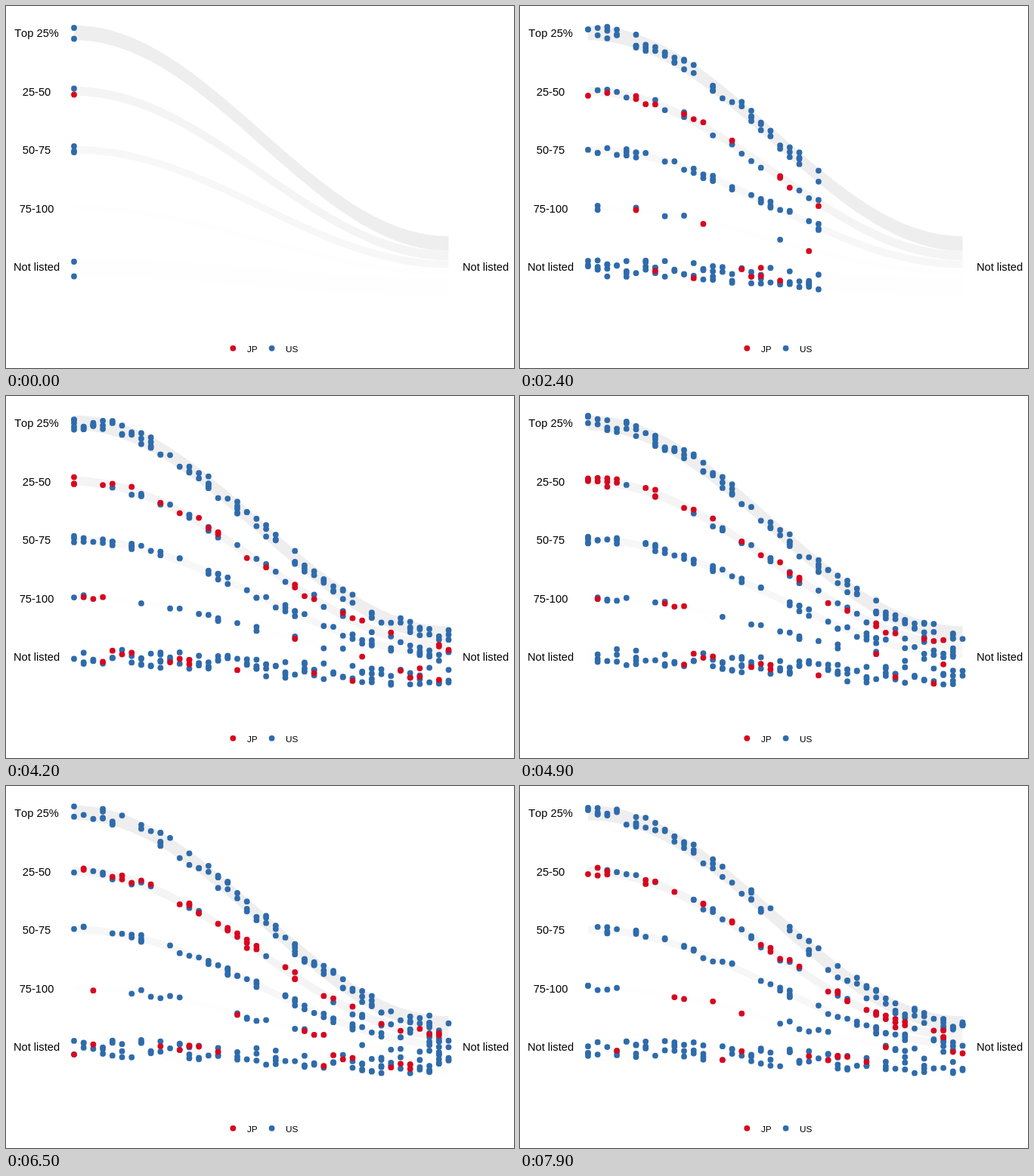
Animation of 672 by 480 pixels, one loop 8 s. Source, as an HTML page:

```html
<!DOCTYPE html>
<html lang="en">
<head>
<meta charset="utf-8">
<title>Flow between groups</title>
<style>
  html, body { margin: 0; width: 100%; height: 100%; overflow: hidden; background: #fff; }
  svg { display: block; }
  text { font: 14.67px "Liberation Sans", Arial, sans-serif; font-kerning: none; text-anchor: middle; }
  .key { font-size: 11.73px; text-anchor: start; }
</style>
</head>
<body>
<svg width="672" height="480" viewBox="0 0 672 480">
  <g id="bands"></g>
  <g id="labels"></g>
  <text x="634.5" y="351">Not listed</text>
  <g id="legend"></g>
  <text class="key" x="319" y="459">JP</text>
  <text class="key" x="370" y="459">US</text>
  <g id="dots"></g>
</svg>
<script>
const LEFT = 90, STEP = 12.705, STEPS = 39, FRAMES = 80, FRAME_MS = 100;
const JP = '#d7071f', US = '#2f6bab';

// from/to: centre heights, half: half thickness, rate: dots per step,
// jp: share of JP, first: offsets of the dots present at the start
const bands = [
  { label: 'Top 25%', from: 35.5, to: 315, half: 9.8, fill: '#eee', rate: 2.4, jp: 0, first: [-6.5, 8] },
  { label: '25-50', from: 113, to: 331, half: 6, fill: '#f4f4f4', rate: 1.4, jp: .5, first: [-3.5, 4.5] },
  { label: '50-75', from: 190.5, to: 342.5, half: 5, fill: '#f7f7f7', rate: 1.4, jp: 0, first: [-4.5, 2, 3.5] },
  { label: '75-100', from: 267.5, to: 353.5, half: 3.5, fill: '#fefefe', rate: .6, jp: .35, first: [] },
  { label: 'Not listed', from: 347, to: 372.5, half: 12, fill: '#fefefe', rate: 3, jp: .12, first: [-8, 11.5] }
];

let seed = 41;
function random() {
  seed = seed + 0x6D2B79F5 | 0;
  let n = Math.imul(seed ^ seed >>> 15, 1 | seed);
  n = n + Math.imul(n ^ n >>> 7, 61 | n) ^ n;
  return ((n ^ n >>> 14) >>> 0) / 2 ** 32;
}

const get = id => document.getElementById(id);
const circle = (x, y, color) => `<circle cx="${x}" cy="${y}" r="3.9" fill="${color}"/>`;

// Height of a band's centre line after k steps
const centre = (band, k) =>
  band.from + (band.to - band.from) * (1 - Math.cos(Math.PI * k / STEPS)) / 2;

function ribbon(band) {
  const edge = side => Array.from({ length: STEPS + 1 }, (_, k) =>
    `${LEFT + k * STEP},${centre(band, k) + side * band.half}`);
  return `<polygon fill="${band.fill}" points="${[...edge(-1), ...edge(1).reverse()].join(' ')}"/>`;
}

const dots = bands.flatMap(band => band.first.map(offset =>
  ({ band, born: 0, offset, color: band.jp > .4 && offset > 0 ? JP : US })));

for (let born = 1; born < FRAMES; born++) {
  for (const band of bands) {
    for (let i = 0; i < 6; i++) {
      if (random() > band.rate / 6) continue;
      const offset = (random() * 2 - 1) * band.half;
      dots.push({ band, born, offset, color: random() < band.jp ? JP : US });
    }
  }
}
// JP dots lie on top
dots.sort((a, b) => (a.color === JP) - (b.color === JP));

get('bands').innerHTML = bands.map(ribbon).join('');
get('labels').innerHTML = bands.map((b, i) =>
  `<text x="40.5" y="${41 + i * 77.5}">${b.label}</text>`).join('');
get('legend').innerHTML = circle(300.3, 453.8, JP) + circle(351.6, 453.8, US);

const start = performance.now();
let shown = -1;
function draw() {
  const frame = Math.floor((performance.now() - start) / FRAME_MS) % FRAMES;
  if (frame !== shown) {
    shown = frame;
    get('dots').innerHTML = dots
      .filter(d => d.born <= frame && frame - d.born <= STEPS)
      .map(d => {
        const k = frame - d.born;
        return circle(LEFT + k * STEP, centre(d.band, k) + d.offset, d.color);
      }).join('');
  }
  requestAnimationFrame(draw);
}
draw();
</script>
</body>
</html>
```
